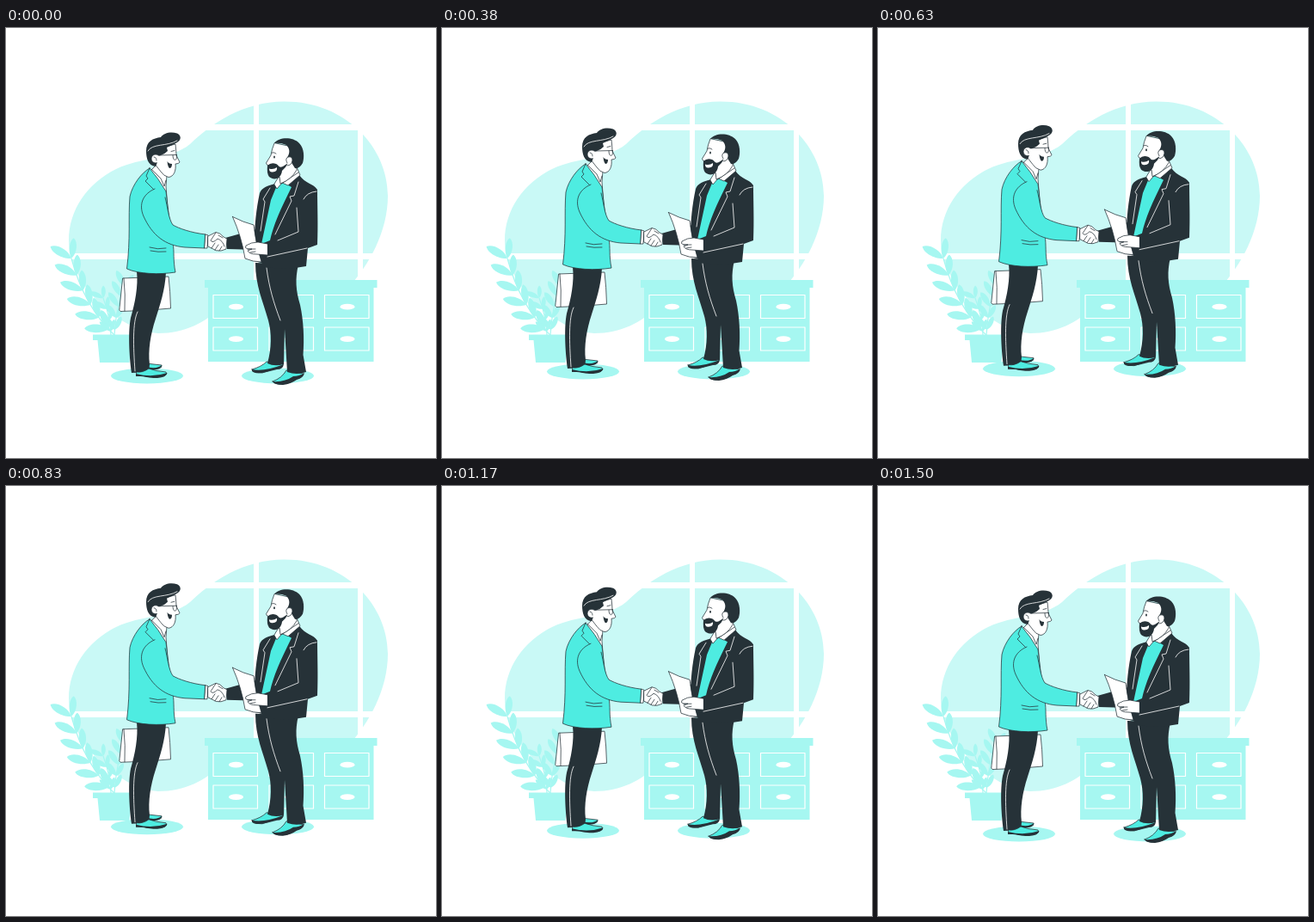
Animation, 500 px wide and 500 px high, one loop 1.54 s. Source, as an HTML page:

```html
<!DOCTYPE html>
<html lang="en">
<head>
<meta charset="utf-8">
<title>Handshake</title>
<style>
  html, body { margin: 0; width: 100%; height: 100%; overflow: hidden; background: #fff; }
  svg { display: block; width: 100%; height: 100%; }
  .pale { fill: #c9f9f6; }
  .mid { fill: #a6f7f1; }
  .teal { fill: #4eece1; }
  .dark { fill: #263238; }
  .white { fill: #fff; }
  .ink { stroke: #263238; stroke-width: .75; stroke-linejoin: round; stroke-linecap: round; }
  .line { fill: none; }
  .chalk { fill: none; stroke: #fff; stroke-width: .8; stroke-linecap: round; stroke-linejoin: round; }
</style>
</head>
<body>
<svg viewBox="0 0 500 500">
  <!-- window -->
  <path class="pale" d="M73 247C73 212 94 181 128 164C157 150 192 153 214 135C240 110 276 86 323 85.500C395 85 444 139 444 195C444 238 421 276 400 300L250 325C232 342 208 355 177 355C132 352 73 298 73 247Z"/>
  <path class="white" d="M288 80h6v215h-6zM409 112h6v183h-6zM220 112h195v7H220zM70 262h360v7H70z"/>

  <!-- cabinet -->
  <path class="mid" d="M231 293H431.500V302H427.500V388H235V302H231Z"/>
  <g id="drawers"></g>

  <!-- plant -->
  <g id="plant" class="mid"></g>
  <path class="mid" d="M101 356.500H149V363H146L143.500 389H109L106.500 363H101Z"/>

  <g id="people">
    <ellipse class="mid" cx="164" cy="404.500" rx="42" ry="9"/>
    <ellipse class="mid" cx="316" cy="404.500" rx="42" ry="9"/>

    <!-- left man -->
    <path class="white ink" d="M136 291L189 289Q191 306 191.500 326Q162 329 133 329.500Q131 329 132 325Z"/>
    <path class="line ink" d="M137 291Q139 310 138 329"/>
    <path class="teal ink" d="M163 390L172 391L181 392Q182 395 177 396L163 396Z"/>
    <path class="dark" d="M163 394Q175 397 181.500 392Q180 397 172 397.500L163 398Z"/>
    <path class="dark" d="M152 283L186 284C185 305 179 322 174 338C168 356 165 375 167 391L166 400L146 401C143 380 142 352 145 337C150 320 154 300 152 283Z"/>
    <path class="chalk" d="M153 330C147 342 148 370 150 399"/>
    <path class="teal ink" d="M152 400Q159 401 166 396Q174 399 186 400Q188 403 183 405Q167 407 152 404Z"/>
    <path class="dark" d="M151 402Q170 407 187.500 401Q187 406 176 407Q166 407 160 405L151 405Z"/>

    <path class="white ink" d="M168 166L176 158L187 171L186 184L188 210Z"/>
    <path class="line ink" d="M169 164L180 175L184 184L186 177"/>
    <path class="teal ink" d="M167 163C158 168 147 182 144 196C142 220 145 245 140.500 280C154 286 178 287 197 284C194 270 196 260 194 250L189 215L186 190Q178 176 167 163Z"/>
    <path class="line ink" d="M167 163L163 172L165 175L162 178L184 200L188 219M167 255Q176 258 186 256M168 259Q177 261 186 260"/>
    <path class="teal ink" d="M173 187C159 193 154 205 160 219C170 241 185 253 208 255L231 256L232 240C215 238 201 233 194 229C189 222 188 208 185 197"/>

    <path class="white ink" d="M178 140L197 135Q198 144 198 148L202 156Q201 158 197 158C198 166 195 173 189 173.500Q183 172 180 167L173 158Z"/>
    <path class="dark" d="M174 161C165 160 163 151 163 143C163 132 171 128 180 127C183 122 192 120 199 122.500C204 125 204 130 199 133C194 136 190 137 187 139L188 143Q184 147 180 148L178 151Z"/>
    <path class="chalk" d="M165 143C170 134 187 138 199 131"/>
    <circle class="white ink" cx="174" cy="152" r="5"/>
    <path class="white" d="M175 149L181 148L181 158L176 159Z"/>
    <path class="line ink" d="M178 148L198.500 147.500M194 148Q194 153 196.500 153.500Q199 153 198.500 147.500M192 143.500L196 142.500M172 150Q175 150 175 154"/>
    <path class="dark" d="M187.500 155Q189 158 193 158Q193 163 190 163Q188 161 187.500 155Z"/>

    <!-- right man -->
    <path class="dark" d="M255 244L291 234L293 258L257 257Z"/>
    <path class="teal ink" d="M286 397Q297 394 303 388L322 390Q322 396 313 396L298 401Q287 401 286 397Z"/>
    <path class="dark" d="M286 397Q300 400 323 391Q322 397 315 397L303 400Q290 403 286 399Z"/>
    <path class="teal ink" d="M310 411Q321 407 326 398L346 402Q344 407 337 408L328 413Q313 416 310 411Z"/>
    <path class="dark" d="M310 411Q324 412 334 405Q341 405 347 401Q346 407 338 409Q331 414 322 415Q312 415 310 411Z"/>
    <path class="dark" d="M290 273L340 275C336 292 337 305 342 322C346 340 347 362 345.500 380L349 400Q338 404 327 400L324 350L323 391Q312 394 304 390C309 372 309 355 305 340C299 318 290 300 290 273Z"/>
    <path class="chalk" d="M303 279C306 302 311 319 319 340"/>

    <path class="dark" d="M314 181C304 183 297 186 295 192C291 210 289 230 289 245L284 270L297 273L302 278Q325 282 349 277L351 256L362 252C363 229 362 207 362 188C358 181 348 181 341 171Z"/>
    <path class="teal" d="M315 183L308 200L297 251L307 247C311 229 319 211 332 185L323 180Z"/>
    <path class="white ink" d="M319 170L338 162L342 171L328 183L321 180L315 187L312 182Z"/>
    <path class="line ink" d="M320 181L318 173M322 180L340 168"/>
    <path class="chalk" d="M340 179L335 195L330 196L332 201L313 240M307 186L299 199L301 202L296 236M338 209L340 237L316 247M346 199Q350 191 361 190M304 266L350 256"/>

    <path class="white ink" d="M312 134Q309 141 308 148L302.500 157Q303 160 306 160L306 171Q313 177 318 173L319 181Q332 176 338 165L340 140Z"/>
    <path class="dark" d="M312 134C317 127 333 126 341 134C347 140 347 151 345 157Q341 164 336 163L331 155L326 152C330 147 331 141 326 136Q319 133 312 134Z"/>
    <path class="dark" d="M304 160Q308 156 314 158C318 160 317 163 322 161L328 157Q325 163 321 166C320 175 312 178 306 173Q303 169 304 160Z"/>
    <path class="white" d="M306 163.500Q311 165 315 162Q316 167 310 167.500Q306 168 306 163.500Z"/>
    <path class="white ink" d="M327 157Q324 152 328 150Q333 149 333 154Q332 160 327 160"/>
    <path class="line ink" d="M309 145Q312 144 314 146"/>
    <ellipse class="dark" cx="312" cy="150" rx=".9" ry="1.500"/>

    <!-- paper and holding hand -->
    <path class="white ink" d="M263.500 219.500Q276 226 288 229Q290 250 297 272Q287 272 278 268Q274 243 263.500 219.500Z"/>
    <path class="white ink" d="M304 251L293 249Q285 249 279 253Q277 256 281 257L286 257L281 259Q283 263 291 263L304 264Z"/>
    <path class="line ink" d="M281 257L290 257M284 261L290 260"/>

    <!-- clasped hands -->
    <path class="white ink" d="M232 240L235 241L234 256L231 256Z"/>
    <path class="white ink" d="M235 242L244 237.500Q249 238 253 243L257 245L256 257L250 259Q244 260 239 256L235 254Z"/>
    <path class="line ink" d="M244 238L238 247Q240 251 246 245Q252 247 254 254M239 256L243 250M243 258L247 252M248 259L251 254M247 241L252 244"/>
  </g>
</svg>
<script>
  const byId = id => document.getElementById(id);

  // Drawers with oval handles
  for (const y of [310.5, 348])
    for (const x of [241, 306, 370.5])
      byId('drawers').innerHTML += `<path class="chalk" style="stroke-width:1.2" d="M${x} ${y}h51.500v27h-51.500z"/>
        <ellipse class="white" cx="${x + 26.5}" cy="${y + 13.7}" rx="8.500" ry="3.400"/>`;

  const leaf = (x, y, angle, size) =>
    `<path transform="translate(${x} ${y}) rotate(${angle}) scale(${size})"
      d="M0 0C.25 -.2 .8 -.27 1 -.04C.85 .2 .3 .25 0 0Z"/>`;

  // Leaves in pairs along a curved stem, ending in a single leaf
  function frond([x0, y0], [cx, cy], [x1, y1], pairs, size) {
    const at = (a, b, c, t) => (1 - t) * (1 - t) * a + 2 * t * (1 - t) * b + t * t * c;
    const slope = (a, b, c, t) => (1 - t) * (b - a) + t * (c - b);
    let out = `<path fill="none" stroke="#a6f7f1" stroke-width="1.2" d="M${x0} ${y0}Q${cx} ${cy} ${x1} ${y1}"/>`;
    for (let i = 0; i <= pairs; i++) {
      const t = .1 + .9 * i / pairs;
      const x = at(x0, cx, x1, t), y = at(y0, cy, y1, t);
      const dir = Math.atan2(slope(y0, cy, y1, t), slope(x0, cx, x1, t)) * 180 / Math.PI;
      out += leaf(x, y, dir - 43, size) + leaf(x, y, dir + 24, size * .85);
    }
    byId('plant').innerHTML += out;
  }
  frond([126, 357], [91, 324], [76, 268], 5, 28);
  frond([126, 357], [128, 325], [137, 300], 4, 20);
  frond([122, 357], [121, 335], [113, 314], 3, 17);

  // The pair floats up and down at constant speed, in 24 steps a second
  const LOOP = 1540, STEPS = 37, PERIOD = 1500, PEAK = 725, RISE = 10;
  const lift = t => {
    const away = Math.abs(t - PEAK);
    return RISE * (1 - Math.min(away, PERIOD - away) / (PERIOD / 2));
  };
  const people = byId('people');
  function draw(now) {
    const step = Math.floor(((now % LOOP) + 2) * STEPS / LOOP) % STEPS;
    const dy = lift(0) - lift(step * LOOP / STEPS);
    people.setAttribute('transform', `translate(0 ${dy.toFixed(2)})`);
    requestAnimationFrame(draw);
  }
  draw(performance.now());
</script>
</body>
</html>
```
